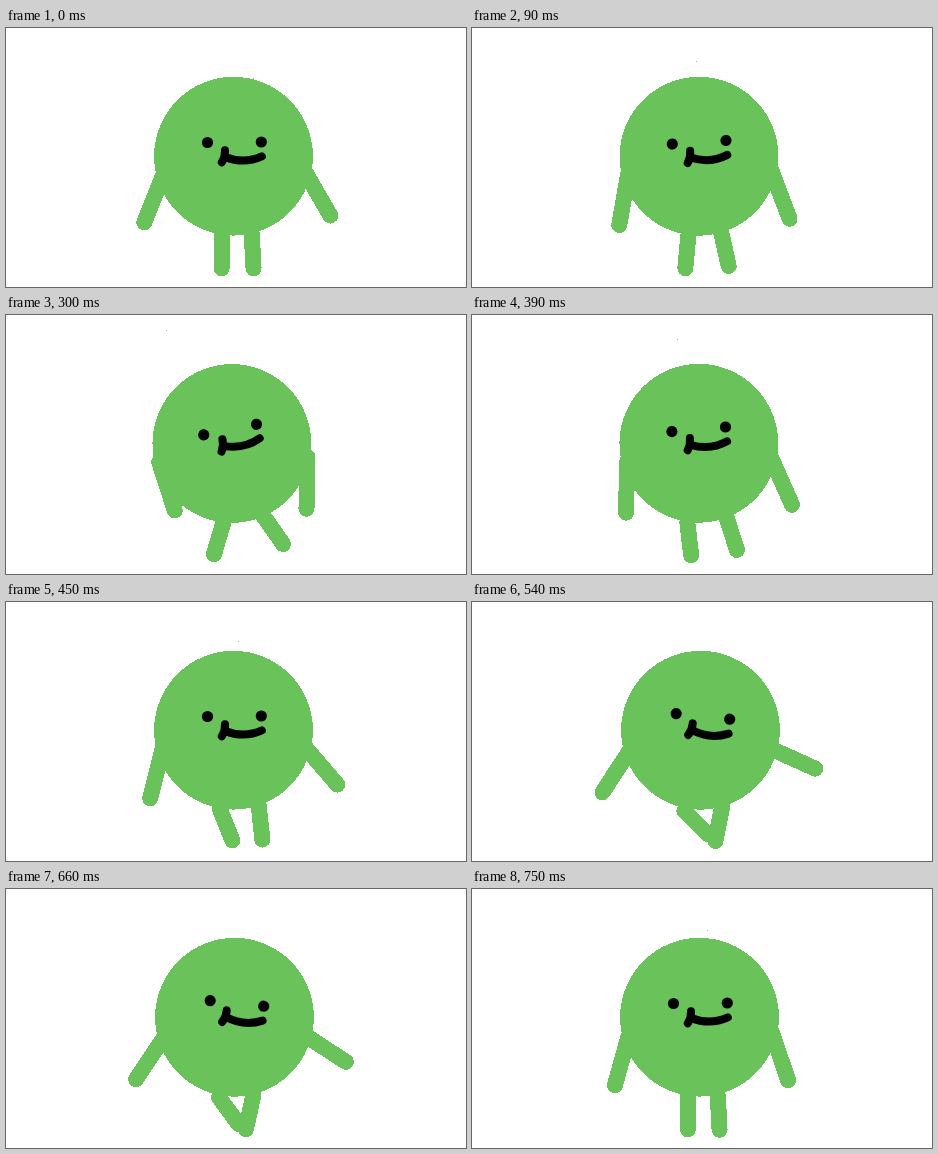
Recreate the animation shown at these times as an HTML page. Size 460 by 259 pixels, loop 0.78 s.

```html
<!DOCTYPE html>
<html lang="en">
<head>
<meta charset="utf-8">
<title>Swaying blob</title>
<style>
  html, body { margin: 0; width: 100%; height: 100%; overflow: hidden; background: #fff; }
  svg { display: block; width: 100vw; height: 100vh; }
  .limb { stroke: #6ac25b; stroke-width: 16; stroke-linecap: round; }
  .mouth { fill: none; stroke: #000; stroke-width: 8; stroke-linecap: round; }
</style>
</head>
<body>
<svg viewBox="0 0 460 259">
  <g shape-rendering="crispEdges">
    <g id="armL">
      <line class="limb" y1="-6" y2="45"/>
      <rect x="47.2" y="-129.5" width="1" height="1" fill="#a9b5a6"/>
    </g>
    <line id="armR" class="limb" y1="-6" y2="46"/>
    <line id="legL" class="limb" y1="-5" y2="28"/>
    <line id="legR" class="limb" y1="-5" y2="30"/>
  </g>
  <g id="body">
    <circle cx="227.5" cy="128.2" r="79.4" fill="#6ac25b" shape-rendering="crispEdges"/>
    <circle cx="201.5" cy="114.5" r="5.6"/>
    <circle cx="255.3" cy="114" r="5.6"/>
    <path class="mouth" d="M219 122.3Q219.3 129 215.8 134.3M219 129Q238 136.5 255.8 128.4"/>
  </g>
</svg>
<script>
const LOOP = 780, STEP = 30;
const TIMES = [0, 300, 600, 750];

// Values at the four key times, joined by straight tweens.
const rig = {
  body: [0, -10.8, 10.8, 0],
  armL: [21.8, -17.9, 45.8, 15.5],
  armR: [-30, 1, -82.4, -18.8],
  legL: [0.5, 16.5, -60.5, 0],
  legR: [-3, -35, 22.5, -3],
  hipX: [246, 259.8, 246.5, 246],
  hipY: [210.5, 204.4, 211, 210.8]
};

const parts = {};
for (const id of ["body", "armL", "armR", "legL", "legR"]) {
  parts[id] = document.getElementById(id);
}

function tween(keys, t) {
  let i = 0;
  while (i < TIMES.length - 2 && t >= TIMES[i + 1]) i++;
  const k = (t - TIMES[i]) / (TIMES[i + 1] - TIMES[i]);
  return keys[i] + (keys[i + 1] - keys[i]) * k;
}

function hang(id, x, y, t) {
  parts[id].setAttribute("transform", `translate(${x} ${y}) rotate(${tween(rig[id], t)})`);
}

function draw(ms) {
  const t = Math.floor((ms % LOOP) / STEP) * STEP;
  parts.body.setAttribute("transform", `rotate(${tween(rig.body, t)} 228 137)`);
  hang("armL", 155, 152.7, t);
  hang("armR", 301.3, 147.7, t);
  hang("legL", 215.9, 212.4, t);
  hang("legR", tween(rig.hipX, t), tween(rig.hipY, t), t);
}

const start = performance.now();
function tick(now) {
  draw(Math.max(0, now - start));
  requestAnimationFrame(tick);
}
draw(0);
requestAnimationFrame(tick);
</script>
</body>
</html>
```
